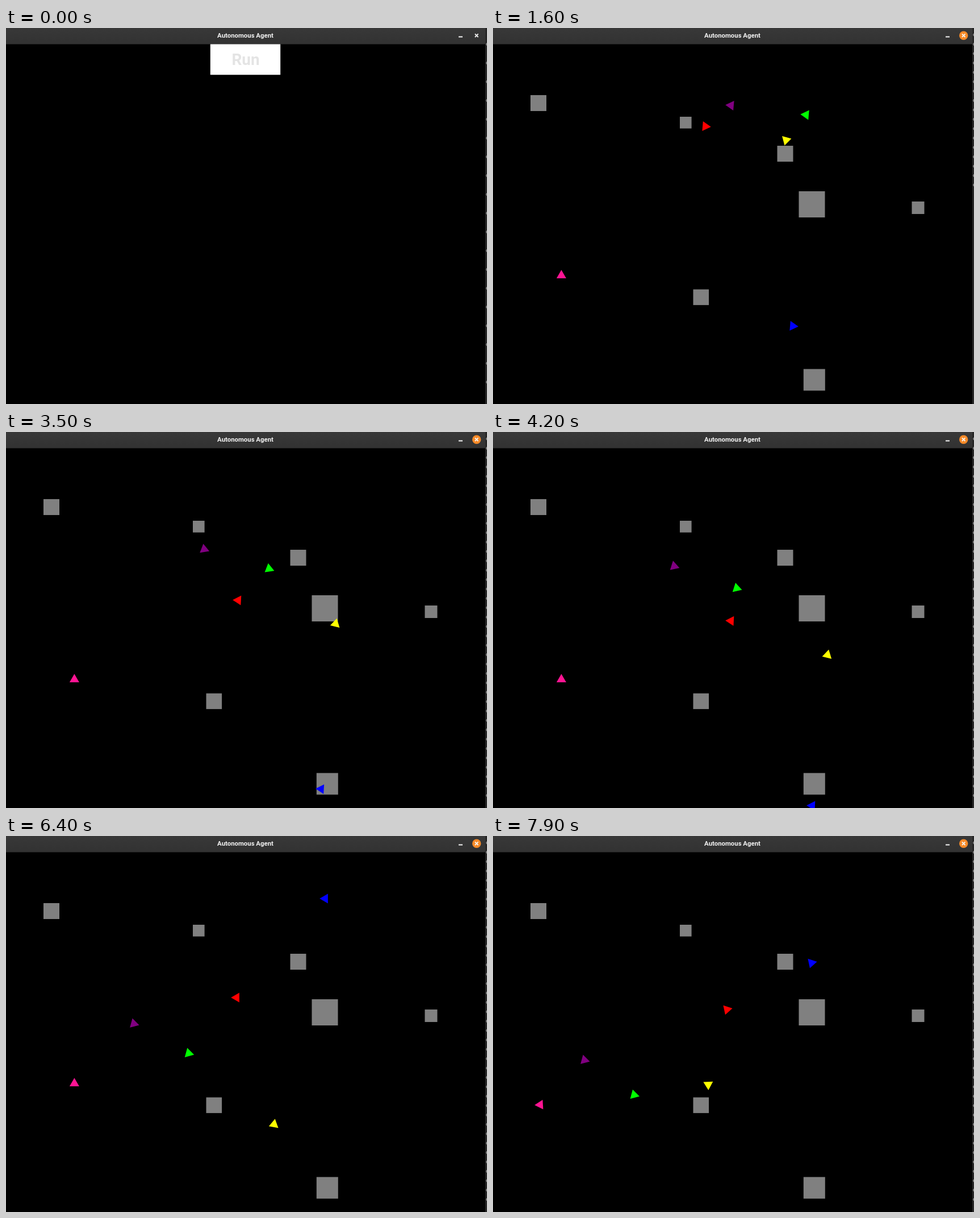
Animation, 847 px wide and 661 px high, one loop 8 s. Source, as an HTML page:

```html
<!DOCTYPE html>
<html lang="en">
<head>
<meta charset="utf-8">
<title>Autonomous Agent</title>
<style>
  html, body { margin: 0; width: 100%; height: 100%; overflow: hidden; background: #000; }
  svg { display: block; }
  text { font-family: Roboto, sans-serif; text-anchor: middle; }
</style>
</head>
<body>
<svg width="847" height="661" viewBox="0 0 847 661">
  <defs>
    <linearGradient id="bar" x2="0" y2="1">
      <stop stop-color="#383838"/><stop offset="1" stop-color="#323232"/>
    </linearGradient>
  </defs>
  <rect width="847" height="661"/>
  <g id="world"></g>
  <g id="button">
    <rect x="359.8" y="28" width="123.4" height="54.3" fill="#fff"/>
    <text x="422" y="65.3" font-size="28" font-weight="700" fill="#e4e4e4">Run</text>
  </g>
  <rect width="844" height="28.5" fill="url(#bar)"/>
  <text x="421.5" y="17.4" font-size="11.4" font-weight="600" fill="#f2f2f2">Autonomous Agent</text>
  <circle id="hover" cx="828.7" cy="13.2" r="7.7" fill="#f68a28"/>
  <path d="M797 15.5h7M825.9 10.4l5.6 5.6m0-5.6l-5.6 5.6" stroke="#f6f6f6" stroke-width="1.8"/>
  <rect x="844" width="3" height="661" fill="#262626"/>
  <g id="edge" fill="none" stroke="#ccc"></g>
</svg>
<script>
// Times are in seconds
const LOOP = 8, RUN = 0.7, HOVER = 1.2;
const WRAP_AT = 673, WRAP_BY = 657, RADIUS = 9.8;

const obstacles = [
  { x: 66, y: 118, side: 28 }, { x: 329, y: 156, side: 20.6 },
  { x: 500.5, y: 207, side: 28 }, { x: 538.5, y: 287, side: 46 },
  { x: 737.5, y: 305, side: 22 }, { x: 352.5, y: 459.5, side: 27.6 },
  { x: 546.8, y: 599.5, side: 38 }
];

// Cruisers head down-left, losing `pause` seconds while they settle into their heading
const cruisers = [
  { fill: '#800080', x: 457.4, y: 97.6, start: RUN, speed: 42.7, pause: 0.26, facing: 135, swing: 136 },
  { fill: '#00ff00', x: 595, y: 108.7, start: RUN, speed: 48.8, pause: 0.1, facing: 135, swing: 136 },
  { fill: '#ff1493', x: 120.4, y: 435, start: 6.8, speed: 34, pause: 0, facing: 188, swing: -38 }
];

// Wanderers pass through waypoints at shared times and sway together
const times = [1.6, 2.7, 4.2, 5.4, 6.4, 7.9];
const sway = [5, 59, 63, 84, 60, 108];
const wanderers = [
  { fill: '#ff0000', lean: 0, xs: [374, 393, 419, 412, 406, 412], ys: [173, 239, 332, 308, 284, 305] },
  { fill: '#ffff00', lean: -20, xs: [516, 557, 589, 546, 472, 379], ys: [197, 275, 392, 481, 507, 437] },
  { fill: '#0000ff', lean: 0, xs: [528, 544, 562, 563, 562, 561], ys: [524, 591, 657, 708, 767, 880] }
];

const $ = id => document.getElementById(id);
const clamp = v => Math.min(1, Math.max(0, v));
const show = (el, on) => el.setAttribute('visibility', on ? 'visible' : 'hidden');

function add(parent, name, attrs) {
  const el = document.createElementNS('http://www.w3.org/2000/svg', name);
  for (const key in attrs) el.setAttribute(key, attrs[key]);
  return parent.appendChild(el);
}

function slope(values, i) {
  const a = Math.max(i - 1, 0), b = Math.min(i + 1, times.length - 1);
  return (values[b] - values[a]) / (times[b] - times[a]);
}

// Cubic Hermite curve through the waypoints, straight before the first one
function spline(values, t) {
  if (t < times[0]) return values[0] + slope(values, 0) * (t - times[0]);
  let i = 0;
  while (i < times.length - 2 && t > times[i + 1]) i++;
  const span = times[i + 1] - times[i], u = (t - times[i]) / span, v = 1 - u;
  return v * v * (1 + 2 * u) * values[i] + u * u * (3 - 2 * u) * values[i + 1]
    + span * u * v * (v * slope(values, i) - u * slope(values, i + 1));
}

function cruise({ x, y, start, speed, pause, facing, swing }, t) {
  const s = Math.max(t - start, 0);
  const way = speed * (s - pause * clamp(s - 0.9));
  return [x - way, y + way, facing + swing * Math.exp(-s / 0.9)];
}

function wander({ xs, ys, lean }, t) {
  const y = spline(ys, t);
  return [spline(xs, t), y > WRAP_AT ? y - WRAP_BY : y, spline(sway, t) + lean];
}

for (const { x, y, side } of obstacles)
  add($('world'), 'rect', { x, y, width: side, height: side, fill: '#808080' });

const triangle = [0, 1, 2].map(i => {
  const a = i * Math.PI * 2 / 3;
  return [RADIUS * Math.cos(a), RADIUS * Math.sin(a)];
}).join(' ');
const spawn = move => agent =>
  ({ agent, move, el: add($('world'), 'polygon', { points: triangle, fill: agent.fill }) });
const agents = [...cruisers.map(spawn(cruise)), ...wanderers.map(spawn(wander))];

// Slivers of the window behind, cut off by the right edge
const slivers = Array.from({ length: 39 }, (_, i) =>
  add($('edge'), 'circle', { cx: 848, cy: 12 + i * 16.5, r: 2.2 }));
const sliverShown = (i, t) => t < RUN ? i % 2 : t >= 2.5 || i < 17;

function draw() {
  const t = Math.floor(performance.now() / 100) % (LOOP * 10) / 10;
  show($('button'), t < RUN);
  show($('world'), t >= RUN);
  show($('hover'), t >= HOVER);
  slivers.forEach((el, i) => show(el, sliverShown(i, t)));
  for (const { agent, move, el } of agents) {
    const [x, y, angle] = move(agent, t);
    el.setAttribute('transform', `translate(${x} ${y}) rotate(${angle})`);
  }
  requestAnimationFrame(draw);
}
draw();
</script>
</body>
</html>
```
